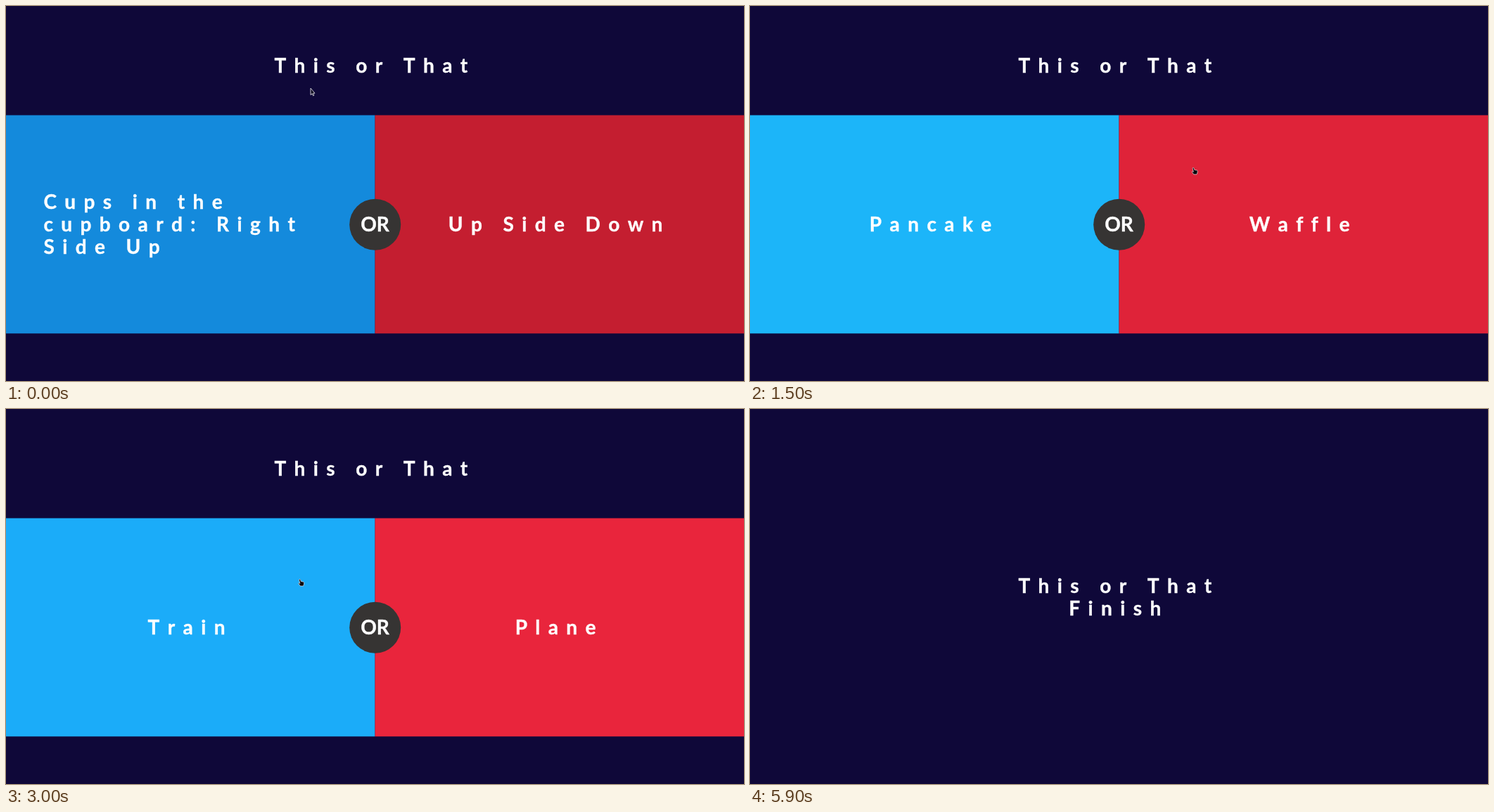
Recreate the animation shown at these times as an HTML page. Size 1049x534 px, loop 6400 ms.

```html
<!DOCTYPE html>
<html lang="en">
<head>
<meta charset="utf-8">
<title>This or That</title>
<style>
  html, body { margin: 0; width: 100%; height: 100%; overflow: hidden; background: #0f0839; }
  svg { display: block; width: 100%; height: 100%; }
  text {
    font: 700 28px Lato, "Open Sans", sans-serif;
    font-kerning: none;
    letter-spacing: 11.4px;
    text-anchor: middle;
    fill: #fff;
    stroke: #fff;
    stroke-width: .4px;
  }
  text.block { text-anchor: start; }
  #or text { letter-spacing: 0; }
</style>
</head>
<body>
<svg viewBox="0 0 1049 534">
  <g id="game">
    <rect id="left" y="155.5" width="524.5" height="310.8"/>
    <rect id="right" x="524.5" y="155.5" width="524.5" height="310.8"/>
    <g id="or">
      <circle cx="524.7" cy="311.2" r="36.5" fill="#363433"/>
      <text x="524.5" y="321">OR</text>
    </g>
  </g>
  <g id="scenes"></g>
  <g id="cursor" stroke-linejoin="round">
    <path id="arrow" d="M0 0V9.6L2.1 7.8L3.5 10.8L4.8 10.2L3.5 7.2H6Z" fill="#0b0820" stroke="#d8d6dc" stroke-width=".9"/>
    <path id="hand" d="M-2.6 -4.6Q-1.6 -5.4 -1 -4.2L-.2 -1.7L3.3 -1Q4.2 -.7 4.2 .4L3.8 3L3 4.8H-1.2L-3.6 1.6Q-4 .4 -2.8 .5L-1.6 1.2L-2.9 -3.6Z" fill="#08060c" stroke="#e6dfe2" stroke-width=".7"/>
    <path id="beam" d="M-2 -4.4Q-.2 -4.6 0 -3.4Q.2 -4.6 2 -4.4M0 -3.4V3.6M-2 4.5Q-.2 4.7 0 3.6Q.2 4.7 2 4.5" fill="none" stroke="#aaa8a6" stroke-width="1.1"/>
  </g>
</svg>
<script>
const LOOP = 6400, STEP = 100;
const FIRST_PICK = 1200, PICK_GAP = 550, FREEZE = 3300, FINISH = 3600;
const MIDDLE = 524.5, PAD = 53.4, LINE = 32, PULSE = 2150;

const pairs = [
  ["Cups in the\ncupboard: Right\nSide Up", "Up Side Down"],
  ["Pancake", "Waffle"],
  ["Coffee Cup", "Thermos"],
  ["Train", "Plane"]
];
const blues = [[20, 138, 220], [26, 160, 248], [29, 196, 250]];
const reds = [[196, 30, 48], [237, 38, 61]];

// Pointer stops: time, x, y
const stops = [
  [200, 433, 117], [900, 669, 231], [1200, 669, 231], [1500, 632, 235],
  [2000, 427, 250], [2500, 402, 251], [3300, 430, 245], [3600, 430, 245],
  [3900, 457, 256], [4400, 520, 294], [4900, 564, 293], [5100, 564, 293],
  [5700, 106, 13], [5900, 56, -16]
];

const $ = id => document.getElementById(id);
const show = (el, on) => el.style.display = on ? "" : "none";
const mix = (a, b, p) => a.map((v, i) => v + (b[i] - v) * p);

function add(parent, tag, attrs = {}) {
  const el = document.createElementNS("http://www.w3.org/2000/svg", tag);
  for (const name in attrs) el.setAttribute(name, attrs[name]);
  return parent.appendChild(el);
}

// Centres lines on y; a wrapped answer starts at the panel's padding
function write(group, content, x, y, wrapped) {
  const lines = content.split("\n");
  lines.forEach((line, i) => {
    const attrs = { x: wrapped ? PAD : x, y: y + LINE * (i - (lines.length - 1) / 2) };
    if (wrapped) attrs.class = "block";
    add(group, "text", attrs).textContent = line;
  });
}

const scenes = pairs.map(([a, b], i) => {
  const group = add($("scenes"), "g");
  write(group, "This or That", MIDDLE, 95);
  write(group, a, MIDDLE / 2, 321, a.includes("\n"));
  write(group, b, MIDDLE * 1.5, 321);
  return { at: i && FIRST_PICK + PICK_GAP * (i - 1), group };
});
const ending = { at: FINISH, group: add($("scenes"), "g") };
write(ending.group, "This or That\nFinish", MIDDLE, 278);
scenes.push(ending);

const wave = (t, half) => (1 - Math.cos(Math.PI * t / half)) / 2;

function blend(colours, p) {
  const at = p * (colours.length - 1);
  const i = Math.min(Math.floor(at), colours.length - 2);
  return `rgb(${mix(colours[i], colours[i + 1], at - i).map(Math.round)})`;
}

function pointer(t) {
  const next = stops.findIndex(s => s[0] > t);
  if (next < 1) return stops.at(next).slice(1);
  const [from, ...a] = stops[next - 1], [to, ...b] = stops[next];
  return mix(a, b, (t - from) / (to - from));
}

function pointerKind(t, y) {
  if (t < FINISH) return y > 155 ? "hand" : "arrow";
  return y > 235 && y < 302 ? "beam" : "arrow";
}

function draw(t) {
  const current = scenes.filter(s => s.at <= t).pop();
  scenes.forEach(s => show(s.group, s === current));
  show($("game"), t < FINISH);

  const glow = Math.min(t, FREEZE);
  $("left").setAttribute("fill", blend(blues, wave(glow, PULSE)));
  $("right").setAttribute("fill", blend(reds, wave(glow, PULSE / 2)));

  const [x, y] = pointer(t);
  const kind = pointerKind(t, y);
  for (const id of ["arrow", "hand", "beam"]) show($(id), id === kind);
  $("cursor").setAttribute("transform", `translate(${x} ${y})`);
}

const start = performance.now();
function tick() {
  const t = (performance.now() - start) % LOOP;
  draw(Math.floor(t / STEP) * STEP);
  requestAnimationFrame(tick);
}
tick();
</script>
</body>
</html>
```
